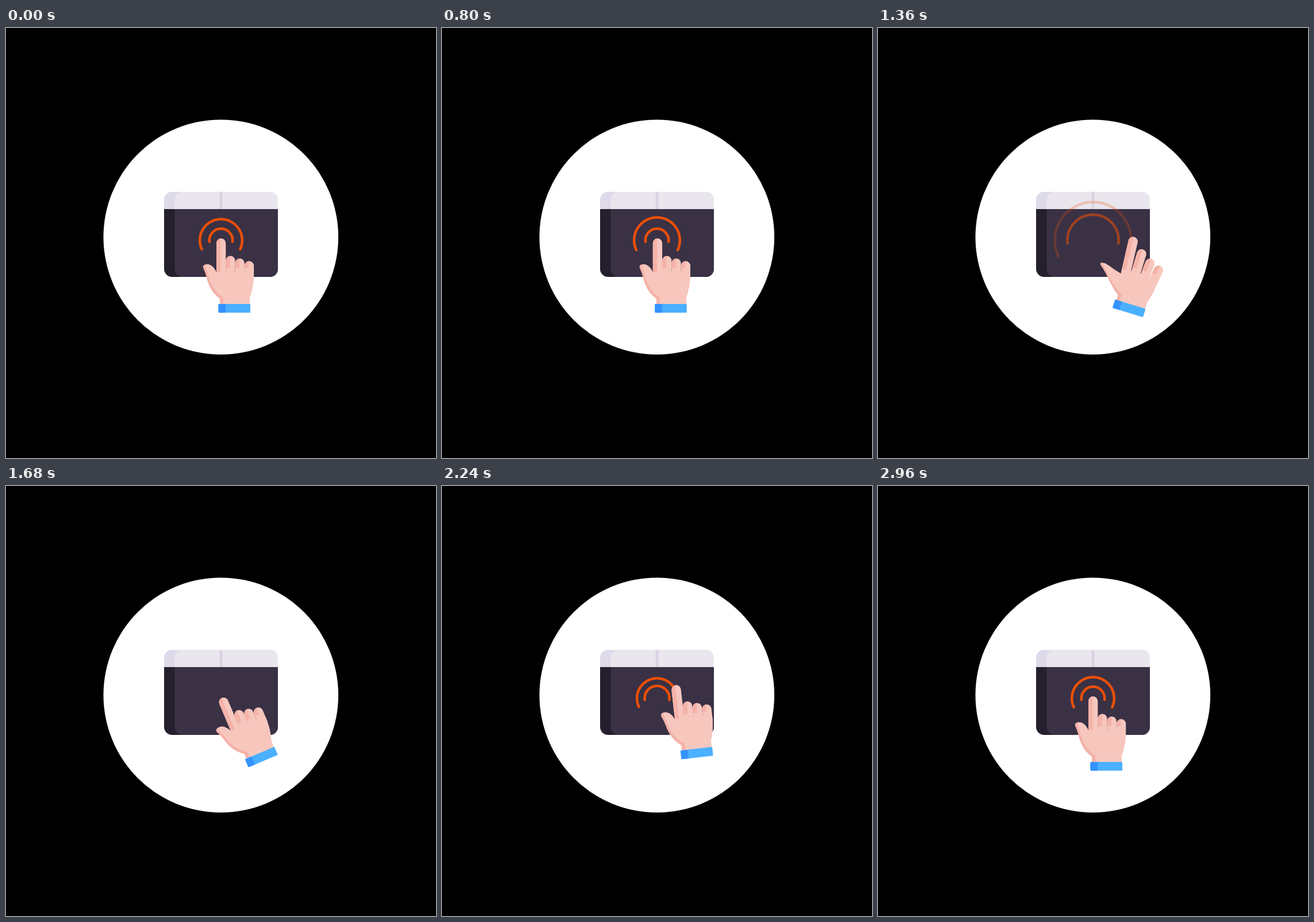
An HTML page that plays this animation: 748 px wide and 748 px high, repeating every 3.04 s.

```html
<!DOCTYPE html>
<html lang="en">
<head>
<meta charset="utf-8">
<title>Touchpad gesture</title>
<style>
  html, body { margin: 0; height: 100%; overflow: hidden; background: #000; }
  svg { display: block; width: 100vw; height: 100vh; }
</style>
</head>
<body>
<svg viewBox="0 0 748 748">
  <clipPath id="pad"><rect x="275" y="285" width="198" height="148" rx="14"/></clipPath>
  <clipPath id="face"><rect x="293.5" y="285" width="190" height="148" rx="14"/></clipPath>
  <circle cx="373.8" cy="363.7" r="204.3" fill="#fff"/>
  <g clip-path="url(#pad)">
    <path fill="#251e2c" d="M275 315h198v118H275z"/>
    <path fill="#dfdae9" d="M275 285h198v30H275z"/>
    <g clip-path="url(#face)">
      <path fill="#3a3145" d="M275 315h198v118H275z"/>
      <path fill="#eae6ed" d="M275 285h198v30H275z"/>
      <path fill="#d9d3e2" d="M371.7 285h4.8v30h-4.8z"/>
    </g>
  </g>
  <g fill="none" stroke="#eb4f07" stroke-width="4.5" stroke-linecap="round">
    <path id="outer"/>
    <path id="inner"/>
  </g>
  <g id="hand">
    <g id="fingers" fill="#f7c7be"></g>
    <path id="palmShade" fill="#f5b2a8"/>
    <path id="palm" fill="#f7c7be"/>
    <g id="creases" fill="#f5b2a8"></g>
    <rect x="369.5" y="480" width="55.5" height="15.3" rx="1.5" fill="#4bb0ff"/>
    <path fill="#3493ff" d="M382 480v15.3h-11a1.5 1.5 0 0 1-1.5-1.5v-12.3a1.5 1.5 0 0 1 1.5-1.5z"/>
  </g>
</svg>
<script>
const LOOP = 3040, STEP = 80;
const $ = id => document.getElementById(id);
const ramp = (t, from, to) => Math.min(1, Math.max(0, (t - from) / (to - from)));
const smooth = u => u * u * (3 - 2 * u);

// Offsets of the cuff from its resting place
const poses = [
  { at: 240, x: 0, y: 0, tilt: 0, open: 0 },
  { at: 1040, x: 1, y: 0, tilt: 0, open: 0 },
  { at: 1360, x: 39.5, y: 0, tilt: 17, open: 1 },
  { at: 1680, x: 47, y: -16, tilt: -23, open: 0 },
  { at: 2240, x: 46, y: -23, tilt: -6.5, open: 0 },
  { at: 2560, x: 17.5, y: -1, tilt: 8.5, open: 0 },
  { at: 2960, x: 0, y: 0, tilt: 0, open: 0 }
];

function poseAt(t) {
  const next = Math.max(1, poses.findIndex(p => p.at > t));
  const [a, b] = t < 2960 ? [poses[next - 1], poses[next]] : [poses[0], poses[0]];
  const u = smooth(ramp(t, a.at, b.at));
  const mix = key => a[key] + (b[key] - a[key]) * u;
  return { x: mix("x"), y: mix("y"), tilt: mix("tilt"), open: mix("open") };
}

function drawRing(id, r, alpha, droop) {
  const a = droop * Math.PI / 180, x = r * Math.cos(a), y = 369.3 + r * Math.sin(a);
  $(id).setAttribute("d", `M${374 - x} ${y}A${r} ${r} 0 1 1 ${374 + x} ${y}`);
  $(id).setAttribute("opacity", alpha);
}

// The rings swell, burst outwards while fading, then part again from one ring
function drawRings(t) {
  if (t < 1600) {
    const burst = ramp(t, 1040, 1520);
    drawRing("outer", 36.8 + 3 * ramp(t, 560, 800) + 40 * burst, (1 - burst) ** 1.25, 25);
    drawRing("inner", 20.2 + 36.5 * burst, 1 - burst * burst, 7);
  } else {
    const back = ramp(t, 1840, 2560), part = 1 - (1 - back) ** 2;
    const alpha = Math.min(1, 2 * back);
    drawRing("outer", 27 + 9.8 * part, alpha, 25);
    drawRing("inner", 27 - 6.8 * part, alpha, 7);
  }
}

function drawFingers(open) {
  const w = 16.3, r = w / 2;
  let bodies = "", creases = "";
  for (let i = 0; i < 4; i++) {
    const x = 366 + w * i, end = i ? 418 : 425, mid = x + r - 0.7;
    const top = i ? 392 + 4.5 * i - 14 / i * open : 366; // outer fingers stretch less
    const turn = `transform="rotate(${4 * (i - 1) * open} ${x + r} 435)"`;
    bodies += `<path ${turn} d="M${x} 436V${top + r}a${r} ${r} 0 0 1 ${w} 0V436z"/>`;
    creases += `<path ${turn} d="M${x} ${end}V${top + r}A${r} ${r} 0 0 1 ${x + r} ${top}` +
      `Q${mid} ${top + 2} ${mid} ${top + r}V${end}z"/>`;
  }
  $("fingers").innerHTML = bodies;
  $("creases").innerHTML = creases;
}

function drawPalm(open) {
  // The thumb swings out, more towards its tip
  const p = (x, y) => {
    const swing = open * ramp(y, 455, 413);
    return `${x - 17 * swing} ${y + 14 * swing} `;
  };
  const rest = `C${p(356, 411)}${p(362, 416)}366 ${425 + 9 * open}` +
    "L382 424H431C431 440 430 452 424 469V481z";
  $("palmShade").setAttribute("d", `M372 481V471C358 461 ${p(352, 447)}${p(349, 434)}` +
    `Q${p(347, 426)}${p(343, 417)}C${p(342, 413)}${p(345, 410.5)}${p(350, 411)}${rest}`);
  $("palm").setAttribute("d", `M378 481V469C362 459 ${p(355, 443)}${p(353, 433)}` +
    `Q${p(351, 424)}${p(347.5, 416)}Q${p(346.5, 412)}${p(350, 411)}${rest}`);
}

function draw(t) {
  const { x, y, tilt, open } = poseAt(t);
  $("hand").setAttribute("transform",
    `translate(${397 + x} ${487.5 + y}) rotate(${tilt}) translate(-397 -487.5)`);
  drawRings(t);
  drawFingers(open);
  drawPalm(open);
}

const start = performance.now();
function frame() {
  draw(Math.floor((performance.now() - start) % LOOP / STEP) * STEP);
  requestAnimationFrame(frame);
}
frame();
</script>
</body>
</html>
```
